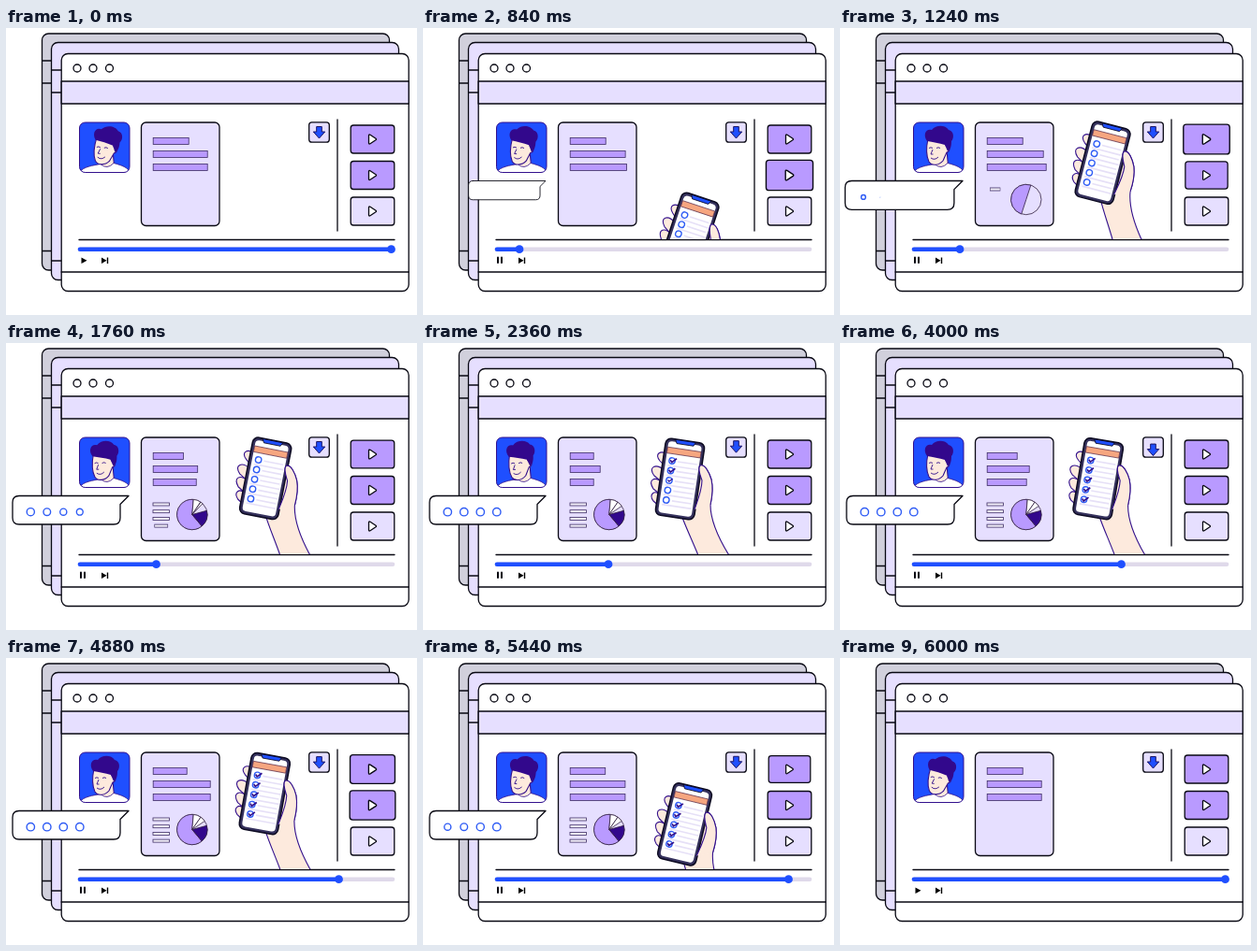
Recreate the animation shown at these times as an HTML page. Size 439 by 307 pixels, loop 6040 ms.

```html
<!DOCTYPE html>
<html lang="en">
<head>
<meta charset="utf-8">
<title>Video lesson</title>
<style>
  html, body { margin: 0; width: 100%; height: 100%; overflow: hidden; background: #fff; }
  svg { display: block; width: 439px; height: 307px; }
  .ink { stroke: #080812; stroke-width: 1.3; stroke-linejoin: round; stroke-linecap: round; }
  .thin { stroke: #3d2c63; stroke-width: .8; }
  .skin { fill: #fdeadd; stroke: #32108c; stroke-width: 1.1; stroke-linejoin: round; }
  .white { fill: #fff; } .none { fill: none; }
  .lilac { fill: #e6dfff; } .purple { fill: #b99aff; }
  .blue { fill: #1f4fff; } .navy { fill: #32088c; }
  .ring { fill: #fff; stroke: #2f5cf5; stroke-width: 1.4; }
</style>
</head>
<body>
<svg viewBox="0 0 439 307">
  <defs>
    <clipPath id="stage"><rect x="230" y="82" width="120" height="144"/></clipPath>
    <clipPath id="portrait"><rect x="78.5" y="101" width="53.5" height="53.5" rx="6"/></clipPath>
  </defs>

  <!-- stacked windows -->
  <g class="ink">
    <rect x="38.5" y="6" width="371" height="253" rx="7" fill="#d1d0dc"/>
    <path d="M38.5 35H60M38.5 59H60M38.5 238.500H60"/>
    <rect class="lilac" x="48.500" y="15.500" width="371" height="254" rx="7"/>
    <path d="M48.500 45H60M48.500 69H60M48.500 249H60"/>
    <rect class="white" x="59.200" y="27.500" width="371" height="254" rx="7"/>
    <rect class="lilac" x="59.200" y="57" width="371" height="24"/>
    <path d="M59.200 261H430M78 226.500H415M354 98V217"/>
    <g class="white">
      <circle cx="76" cy="43" r="4"/><circle cx="93" cy="43" r="4"/><circle cx="110.500" cy="43" r="4"/>
    </g>
  </g>

  <!-- portrait -->
  <g clip-path="url(#portrait)">
    <rect class="blue" x="78" y="100" width="55" height="55"/>
    <path class="skin" d="M101 140V153H116L114 130Z" stroke="none"/>
    <path class="white" d="M78 155C82 148 94 147 101 145.500Q108 152 115 144.500C124 147 130 149 133 155Z" stroke="#32108c" stroke-width=".8"/>
    <g id="head">
      <path class="skin" d="M94 118C92 128 92 137 95 143C98 148 106 147 110 142L114 133C118 132 118 125 113 126L112 117Z"/>
      <path class="navy" d="M93 121C88 114 92 107 98 109C103 103 113 104 116 109C122 110 122 118 119 121C119 127 118 130 115 132L112 125C106 123 99 122 93 121Z"/>
      <path class="none" d="M95 128.500q2-1.500 4 0M103 128.500q2-1.500 4 0M99 130l-2 5h2.500M97 139q4 3 8-1" stroke="#32108c" stroke-width=".9"/>
    </g>
  </g>
  <rect class="none" x="78.500" y="101" width="53.500" height="53.500" rx="6" stroke="#32108c"/>

  <!-- document -->
  <rect class="lilac ink" x="144.500" y="101" width="83.500" height="110.500" rx="5"/>
  <g id="bars" class="purple thin"></g>
  <g id="notes" class="thin" fill="#f4f1fb"></g>
  <g id="pie" stroke="#32203f" stroke-width=".8" stroke-linejoin="round">
    <circle class="lilac" r="16.200"/>
    <path id="main" class="purple"/><path id="dark" class="navy"/>
    <path id="pale" class="white"/><path id="paler" class="white"/>
  </g>

  <!-- hand with phone -->
  <g clip-path="url(#stage)">
    <g id="hand">
      <g class="skin">
        <path d="M262 119C253 114 247 119 253 126L262 136Z"/>
        <path d="M258 136C248 128 240 133 247 142L258 151Z"/>
        <path d="M256 149C247 142 240 146 246 156L256 164Z"/>
        <path d="M254 163C247 156 241 162 246 169L254 176Z"/>
        <path d="M276 184C281 198 288 212 296 232L330 232C319 215 307 192 307 173C309 164 310 155 308 146C306 139 301 130 297 131L286 160Z"/>
      </g>
      <g transform="translate(274.500 145.500) rotate(8.500)">
        <rect x="-21" y="-41.500" width="42" height="83" rx="6" fill="#35315c" stroke="#0b0920" stroke-width="1.500"/>
        <rect class="white" x="-18" y="-38.500" width="36" height="77" rx="4"/>
        <path class="blue" d="M-11-41H11L9-37H-9Z" stroke="#0b0920" stroke-width=".8"/>
        <rect x="-18" y="-32" width="36" height="6.500" fill="#f6a680" stroke="#5a2b48" stroke-width=".7"/>
        <g id="tasks"></g>
      </g>
      <path class="skin" d="M307 173C309 164 310 155 308 146C306 139 301 129 296 131C293 134 296 141 298 147C298 157 294 167 290 178" />
    </g>
  </g>

  <!-- download button -->
  <rect class="lilac ink" x="323.700" y="100.800" width="21.600" height="21.400" rx="3"/>
  <path id="arrow" class="blue" d="M331.700 105.500H337.300V111H340.700L334.500 118L328.300 111H331.700Z" stroke="#1b1464" stroke-width="1" stroke-linejoin="round"/>

  <g id="cards"></g>

  <!-- player controls -->
  <g stroke-width="4.600" stroke-linecap="round">
    <path d="M79 236.700H413" stroke="#dfd9ea"/>
    <path id="played" stroke="#1f4fff"/>
  </g>
  <circle id="knob" class="blue" cy="236.700" r="4.400"/>
  <path id="play" d="M80.500 245.500L86.500 248.700L80.500 252Z"/>
  <path id="pause" d="M80 245.500V251M84 245.500V251" stroke="#080812" stroke-width="2" stroke-linecap="round"/>
  <path d="M102 245.500L107.500 248.700L102 252ZM107.800 245.500H109.200V252H107.800Z"/>

  <!-- speech bubble -->
  <g id="bubble">
    <path class="white ink" d="M14 163.500H131L122 172.500V187Q122 194 115 194H14Q7 194 7 187V170.500Q7 163.500 14 163.500Z"/>
    <g id="dots"></g>
  </g>
</svg>

<script>
const LOOP = 6040, STEP = 40;
const $ = id => document.getElementById(id);
const range = n => [...Array(n).keys()];

function add(parent, tag, attrs) {
  const el = document.createElementNS('http://www.w3.org/2000/svg', tag);
  for (const k in attrs) el.setAttribute(k, attrs[k]);
  return parent.appendChild(el);
}

// Eased value at time t through [time, value] points
function key(t, pts) {
  if (t <= pts[0][0]) return pts[0][1];
  for (let i = 1; i < pts.length; i++) {
    const [t0, a] = pts[i - 1], [t1, b] = pts[i];
    if (t <= t1) {
      const p = (t - t0) / (t1 - t0);
      return a + (b - a) * p * p * (3 - 2 * p);
    }
  }
  return pts[pts.length - 1][1];
}

const move = (el, value) => el.setAttribute('transform', value);
const zoom = (el, x, y, sx, sy = sx) =>
  move(el, `translate(${x} ${y}) scale(${sx} ${sy}) translate(${-x} ${-y})`);
const show = (el, on) => el.setAttribute('visibility', on ? 'visible' : 'hidden');

function sector(el, from, to, r = 16.2) {
  const at = deg => {
    const a = (deg - 90) * Math.PI / 180;
    return `${r * Math.cos(a)} ${r * Math.sin(a)}`;
  };
  show(el, to - from > 1);
  el.setAttribute('d', `M0 0L${at(from)}A${r} ${r} 0 ${to - from > 180 ? 1 : 0} 1 ${at(to)}Z`);
}

const bars = range(3).map(i => add($('bars'), 'rect', { x: 157.2, y: 117.5 + 14 * i, height: 7 }));
const barWidths = [
  [[480, 38], [1240, 38], [2360, 25], [3320, 28], [4000, 32], [4880, 36], [5700, 38]],
  [[480, 58], [1240, 60], [2360, 32], [3320, 51], [4000, 45], [4880, 61], [5700, 58]],
  [[480, 58], [1240, 63], [2360, 25], [3320, 52], [4000, 42], [4880, 61], [5700, 58]]
];
const notes = range(4).map(i => add($('notes'), 'rect', { x: 157, y: 171 + 7.7 * i, width: 17.5, height: 3 }));
const dots = range(4).map(i => add($('dots'), 'circle', { cx: 26.3 + 17.5 * i, cy: 180.7, class: 'ring' }));

const ticks = range(5).map(i => {
  const row = add($('tasks'), 'g', { transform: `translate(-11.2 ${-18 + 10.6 * i})` });
  add(row, 'path', { d: 'M6 0H27M-4 5.3H28', stroke: '#e6e0f7', 'stroke-width': 1.6 });
  add(row, 'circle', { r: 3.2, class: 'ring', 'stroke-width': 1.1 });
  const tick = add(row, 'path', { d: 'M-2 -.5L0 1.600L4.500 -3', fill: 'none', stroke: '#32108c', 'stroke-width': 1.7 });
  return tick;
});

const cards = range(3).map(i => {
  const y = 119 + 38.5 * i, card = add($('cards'), 'g', { class: 'ink' });
  add(card, 'rect', { x: 368.2, y: y - 15, width: 46.600, height: 30, rx: 3, class: i < 2 ? 'purple' : 'lilac' });
  add(card, 'path', { d: `M387.500 ${y - 4}Q387.500 ${y - 5.500} 389 ${y - 4.700}L395 ${y - .8}Q396 ${y} 395 ${y + .8}L389 ${y + 4.700}Q387.500 ${y + 5.500} 387.500 ${y + 4}Z`, class: 'white' });
  return { card, y };
});

function cardScale(t, lead) {
  const local = (t - 480) % 1930 + lead;
  return t < 480 || t > 5780 ? 1 : key(local, [[470, 1], [660, 1.09], [920, 1], [1070, .955], [1310, 1]]);
}

function draw(t) {
  const playing = t >= 480 && t < 5780;
  const x = playing ? 80.5 + (t - 480) * .0625 : 411.5;
  $('knob').setAttribute('cx', x);
  $('played').setAttribute('d', `M79 236.7H${x}`);
  show($('play'), !playing);
  show($('pause'), playing);

  move($('head'), `rotate(${key(t, [[480, 6], [1240, 0], [2360, -3], [3320, -1], [4000, 0], [4880, 0], [5800, 6]])} 106 146)`);

  bars.forEach((bar, i) => bar.setAttribute('width', key(t, barWidths[i])));
  notes.forEach((note, i) => {
    const d = 160 * i;
    zoom(note, 165.75, 0, key(t, [[1080 + d, 0], [1360 + d, 1], [5450, 1], [5700, 0]]), 1);
    show(note, t > 1080 + d && t < 5700);
  });

  const size = key(t, [[820, 0], [1120, 1], [5450, 1], [5750, 0]]);
  move($('pie'), `translate(198.800 183.500) scale(${size})`);
  const end = key(t, [[1240, 378], [1600, 365]]);
  sector($('main'), end - key(t, [[880, 0], [1240, 180], [1600, 225]]), end);
  sector($('dark'), 75, key(t, [[1400, 75], [1760, 140]]));
  sector($('pale'), 5, key(t, [[1500, 5], [1800, 35]]));
  sector($('paler'), 35, key(t, [[1650, 35], [1900, 56]]));

  const lift = key(t, [[560, 140], [1160, 0], [5300, 0], [5740, 140]]);
  const tilt = key(t, [[560, 12], [1240, 6], [2200, 0], [2700, 0], [4000, 1.2], [4880, 1.8], [5700, 6]]);
  move($('hand'), `translate(0 ${lift}) rotate(${tilt} 290 203)`);
  ticks.forEach((tick, i) => {
    const d = 240 * i;
    zoom(tick, 0, 0, key(t, [[1720 + d, 0], [1960 + d, 1]]));
  });

  const beat = (t - 480) % 1000;
  const drop = playing ? key(beat, [[380, 0], [550, 2.800], [760, 0], [880, -.8], [1000, 0]]) : 0;
  move($('arrow'), `translate(0 ${drop})`);

  cards.forEach(({ card, y }, i) => zoom(card, 391.5, y, i < 2 ? cardScale(t, i * 250) : 1));

  zoom($('bubble'), 131, 163.5, key(t, [[480, 0], [1080, 1.025], [1400, 1], [5600, 1], [5900, 0]]));
  dots.forEach((dot, i) => {
    const d = 120 * i;
    const grow = key(t, [[1100 + d, 0], [1360 + d, 1]]);
    const pulse = t > 1500 ? key((t - 1240) % 960, [[240 + 40 * i, 1], [400 + 40 * i, .82], [560 + 40 * i, 1]]) : 1;
    dot.setAttribute('r', 4.2 * grow * pulse);
    show(dot, grow > 0);
  });
}

function tick() {
  draw(Math.floor(performance.now() % LOOP / STEP) * STEP);
  requestAnimationFrame(tick);
}
tick();
</script>
</body>
</html>
```
